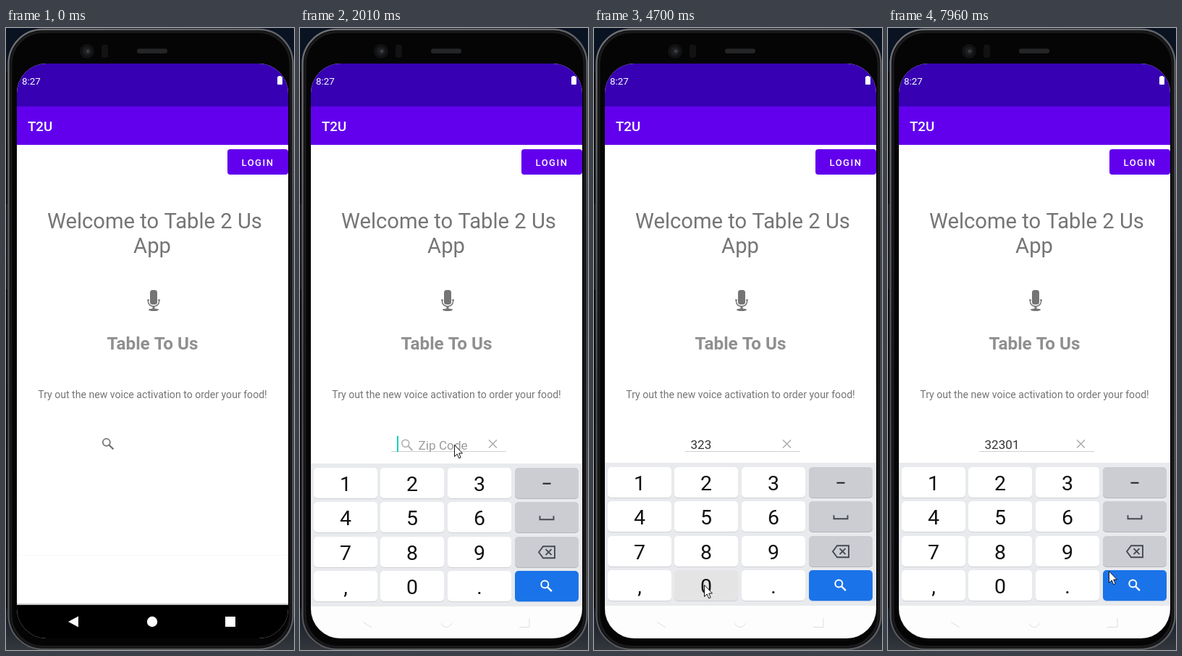
Write an HTML page with a canvas that moves like this. It is 398 by 857 pixels and loops after 8000 ms.

```html
<!DOCTYPE html>
<html lang="en">
<head>
<meta charset="utf-8">
<title>Voice ordering app</title>
<style>
html, body { margin: 0; width: 100%; height: 100%; overflow: hidden; background: #0a1322; }
canvas { display: block; width: 398px; height: 857px; }
</style>
</head>
<body>
<canvas id="stage"></canvas>
<script>
const W = 398, H = 857, LOOP = 8000;
const canvas = document.getElementById('stage');
const dpr = window.devicePixelRatio || 1;
canvas.width = W * dpr;
canvas.height = H * dpr;
const c = canvas.getContext('2d');
const FONT = 'Roboto, "Noto Sans", sans-serif';

// pointer tip: time, x, y
const PATH = [
  [500, 371, 832], [760, 230, 760], [1000, 91, 690], [1260, 143, 583], [1330, 143, 578],
  [1560, 143, 578], [1980, 213, 574], [2150, 213, 574], [2640, 250, 625], [2930, 250, 625],
  [3150, 162, 618], [3330, 162, 618], [3590, 246, 624], [3940, 246, 624], [4300, 175, 745],
  [4500, 152, 767], [4790, 152, 767], [5400, 126, 675], [5880, 82, 641], [6080, 82, 636],
  [6510, 82, 636], [6860, 235, 732], [7190, 235, 732], [7900, 305, 748], [8000, 305, 748]
];

// label, glow on, glow off, key down, key up
const PRESSES = [
  ['3', 2790, 2930, 2860, 2990], ['2', 3100, 3300, 3160, 3370], ['3', 3790, 3930, 3860, 4000],
  ['0', 4560, 4690, 4630, 4780], ['1', 6080, 6220, 6160, 6310]
];
const KEYS = ['123-', '456_', '789<', ',0.?'];
const OPEN = 1550, SLIDE = 1600, SETTLED = 2080, FOCUS = 1900;

const within = (t, a, b) => t >= a && t < b;

function rect(x, y, w, h, color) {
  c.fillStyle = color;
  c.fillRect(x, y, w, h);
}

function round(x, y, w, h, r, color) {
  c.beginPath();
  c.roundRect(x, y, w, h, r);
  c.fillStyle = color;
  c.fill();
}

function disc(x, y, r, color) {
  c.beginPath();
  c.arc(x, y, r, 0, 7);
  c.fillStyle = color;
  c.fill();
}

function poly(points, color) {
  c.beginPath();
  points.forEach(p => c.lineTo(p[0], p[1]));
  c.closePath();
  c.fillStyle = color;
  c.fill();
}

function line(points, color, width) {
  c.beginPath();
  points.forEach((p, i) => i ? c.lineTo(p[0], p[1]) : c.moveTo(p[0], p[1]));
  c.strokeStyle = color;
  c.lineWidth = width;
  c.stroke();
}

function text(str, x, y, size, color, align = 'left', weight = 400, spacing = 0) {
  c.font = `${weight} ${size}px ${FONT}`;
  c.letterSpacing = spacing + 'px';
  c.textAlign = align;
  c.fillStyle = color;
  c.fillText(str, x, y);
}

function lens(x, y, color, width = 1.8) {
  c.beginPath();
  c.arc(x - 2.2, y - 2.2, 5, 0, 7);
  c.strokeStyle = color;
  c.lineWidth = width;
  c.stroke();
  line([[x + 1.6, y + 1.6], [x + 7.4, y + 7.4]], color, width + 0.4);
}

function gradient(x0, y0, x1, y1, ...colors) {
  const g = c.createLinearGradient(x0, y0, x1, y1);
  colors.forEach((color, i) => g.addColorStop(i / (colors.length - 1), color));
  return g;
}

function phone() {
  rect(0, 0, W, H, gradient(0, 790, 0, H, '#0a1322', '#34373d'));
  rect(0, 60, 4, 740, '#08090b');
  rect(0, 242, 2, 118, '#17181b');
  round(2, 1, 395, 856, 48, '#050506');
  c.beginPath();
  c.roundRect(3.5, 2, 393, 854, 47);
  c.strokeStyle = gradient(0, 0, W, H, '#6f7174', '#48494c', '#5c5d60');
  c.lineWidth = 2.5;
  c.stroke();
  c.beginPath();
  c.roundRect(7, 5.5, 386, 847, 44);
  c.strokeStyle = '#1a1a1c';
  c.lineWidth = 3;
  c.stroke();
  disc(112, 32, 10, '#111213');
  disc(112, 32, 6, '#1d1e20');
  disc(113, 32, 2.5, '#3b3d40');
  round(132, 23, 9, 18, 3, '#111213');
  round(181, 28.5, 42, 6.5, 3, '#242526');
}

function mic() {
  const g = '#757575';
  round(199, 361, 10, 20, 3.5, g);
  c.beginPath();
  c.moveTo(196.5, 374);
  c.lineTo(196.5, 377);
  c.bezierCurveTo(196.5, 385.5, 211.5, 385.5, 211.5, 377);
  c.lineTo(211.5, 374);
  c.strokeStyle = g;
  c.lineWidth = 1.5;
  c.stroke();
  rect(195, 374, 3, 1.5, g);
  rect(210, 374, 3, 1.5, g);
  rect(202.5, 383, 3, 4, g);
  c.beginPath();
  c.ellipse(204, 388.3, 7, 1.8, 0, 0, 7);
  c.fillStyle = g;
  c.fill();
}

function page() {
  rect(15, 49, 375, 792, '#fff');
  rect(15, 49, 375, 59, '#3700b3');
  rect(15, 108, 375, 53, '#6200ee');
  text('8:27', 22, 77.5, 13.4, '#fff');
  rect(376.5, 66, 3.5, 2, '#fff');
  round(375, 67, 7, 11, 1, '#fff');
  text('T2U', 30, 142, 18.7, '#fff', 'left', 500);
  round(306, 167, 84, 35, 4, '#6200ee');
  text('LOGIN', 325.5, 189.5, 13, '#fff', 'left', 500, 1.5);
  text('Welcome to Table 2 Us', 57, 276, 29.2, '#757575');
  text('App', 202, 310, 29.2, '#757575', 'center');
  mic();
  text('Table To Us', 202.5, 443, 24.3, '#8f8f8f', 'center', 700);
  text('Try out the new voice activation to order your food!', 202.5, 509.5, 14.1, '#757575', 'center');
}

function navBar() {
  rect(15, 726, 375, 1, '#f8f8f8');
  rect(15, 793, 375, 2, '#c4c4c4');
  rect(15, 795, 375, 46, '#000');
  poly([[86, 818], [100, 810.5], [100, 825.5]], '#fff');
  disc(202, 818, 7.2, '#fff');
  rect(303, 811, 14, 14, '#fff');
}

function field(t) {
  if (t < OPEN) {
    lens(141, 573, '#757575');
    return;
  }
  const done = PRESSES.filter(p => t >= p[4]);
  const value = done.map(p => p[0]).join('');
  const since = done.length ? done[done.length - 1][4] : FOCUS;
  rect(126, 583, 159, 1, '#cfcfcf');
  line([[261, 567.5], [272, 578.5]], '#adadad', 1.6);
  line([[272, 567.5], [261, 578.5]], '#adadad', 1.6);
  let end = 134;
  if (value) {
    text(value, 133.5, 579.5, 17.1, '#333');
    end = 133.5 + c.measureText(value).width;
  } else {
    lens(148, 574.5, '#b3b3b3', 1.7);
    text('Zip Code', 163.5, 581, 17.2, '#9c9c9c');
  }
  if (t >= since && (t - since) % 1000 < 500) {
    rect(end, 562, 2, 22, value ? '#6cc9bd' : '#10d3bb');
  }
}

function keyFace(label, x, y) {
  const g = '#454950';
  if (label === '-') rect(x - 5.5, y - 0.5, 11, 2, '#202124');
  else if (label === '_') line([[x - 9.5, y - 2], [x - 9.5, y + 3], [x + 9.5, y + 3], [x + 9.5, y - 2]], g, 1.9);
  else if (label === '<') {
    const outline = [[x - 11, y], [x - 5, y - 8], [x + 11, y - 8], [x + 11, y + 8], [x - 5, y + 8], [x - 11, y], [x - 5, y - 8]];
    line(outline, g, 1.9);
    line([[x - 1.5, y - 4], [x + 6.5, y + 4]], g, 1.9);
    line([[x + 6.5, y - 4], [x - 1.5, y + 4]], g, 1.9);
  } else if (label === '?') lens(x - 0.5, y - 0.5, '#fff', 2);
  else text(label, x, y + 11, 28.5, '#111', 'center');
}

function keyboard(t) {
  if (t < SLIDE) return;
  const left = Math.max(0, 1 - (t - SLIDE) / (SETTLED - SLIDE));
  const down = PRESSES.find(p => within(t, p[3], p[4]));
  c.save();
  c.translate(0, Math.round(242 * left ** 3));
  rect(15, 599, 375, 197, '#e8eaed');
  rect(15, 796, 375, 45, '#fdfdfd');
  KEYS.forEach((row, j) => [...row].forEach((label, i) => {
    const x = Math.round(18.7 + i * 92.75), y = Math.floor(605 + j * 47.5);
    let color = i < 3 ? '#fff' : label === '?' ? '#1a73e8' : '#cccdd3';
    if (down && down[0] === label) color = '#e4e4e4';
    round(x, y + 1, 88, 42, 5, label === '?' ? '#a9c0e4' : i < 3 ? '#cfd1d5' : '#b4b6bb');
    round(x, y, 88, 42, 5, color);
    keyFace(label, x + 44, y + 21.2);
  }));
  c.restore();
  if (left < 0.4) {
    line([[87, 818.5], [99, 826]], '#dedede', 1);
    c.beginPath();
    c.arc(202, 818, 7.5, 0.3, Math.PI - 0.3);
    c.stroke();
    line([[303, 825.5], [317, 825.5], [317, 813]], '#dedede', 1);
  }
}

// Hermite curve through PATH, at rest beside each pause
function pointerAt(t) {
  let k = 0;
  while (k < PATH.length - 2 && t >= PATH[k + 1][0]) k++;
  const a = PATH[k], b = PATH[k + 1], span = b[0] - a[0];
  const u = Math.min(1, (t - a[0]) / span);
  const still = (p, q) => !p || !q || (p[1] === q[1] && p[2] === q[2]);
  const slope = (i, n) => {
    const p = PATH[i - 1], m = PATH[i], q = PATH[i + 1];
    if (still(p, m) || still(m, q)) return 0;
    return (q[n] - p[n]) / (q[0] - p[0]);
  };
  return [1, 2].map(n => {
    const d = b[n] - a[n], s = u * u * (3 - 2 * u);
    return a[n] + d * s + span * u * (1 - u) * (slope(k, n) * (1 - u) - slope(k + 1, n) * u);
  });
}

function pointer(t) {
  if (t < PATH[0][0]) return;
  const [x, y] = pointerAt(t).map(Math.round);
  const glow = within(t, 1400, 1540) || PRESSES.some(p => within(t, p[1], p[2]));
  if (glow) disc(x, y, 12, 'rgba(246,236,60,0.72)');
  c.save();
  c.translate(x + 0.5, y + 0.5);
  c.lineJoin = 'miter';
  poly([[0, 0], [0, 16], [3.7, 12.5], [6.2, 18.3], [8.7, 17.2], [6.2, 11.5], [11, 11.5]], '#fff');
  c.strokeStyle = '#111';
  c.lineWidth = 1;
  c.stroke();
  c.restore();
}

function draw(t) {
  c.setTransform(dpr, 0, 0, dpr, 0, 0);
  phone();
  c.save();
  c.beginPath();
  c.roundRect(15, 49, 375, 792, 41);
  c.clip();
  page();
  navBar();
  field(t);
  keyboard(t);
  c.restore();
  pointer(t);
}

const start = performance.now();
function tick() {
  draw((performance.now() - start) % LOOP);
  requestAnimationFrame(tick);
}
tick();
</script>
</body>
</html>
```
